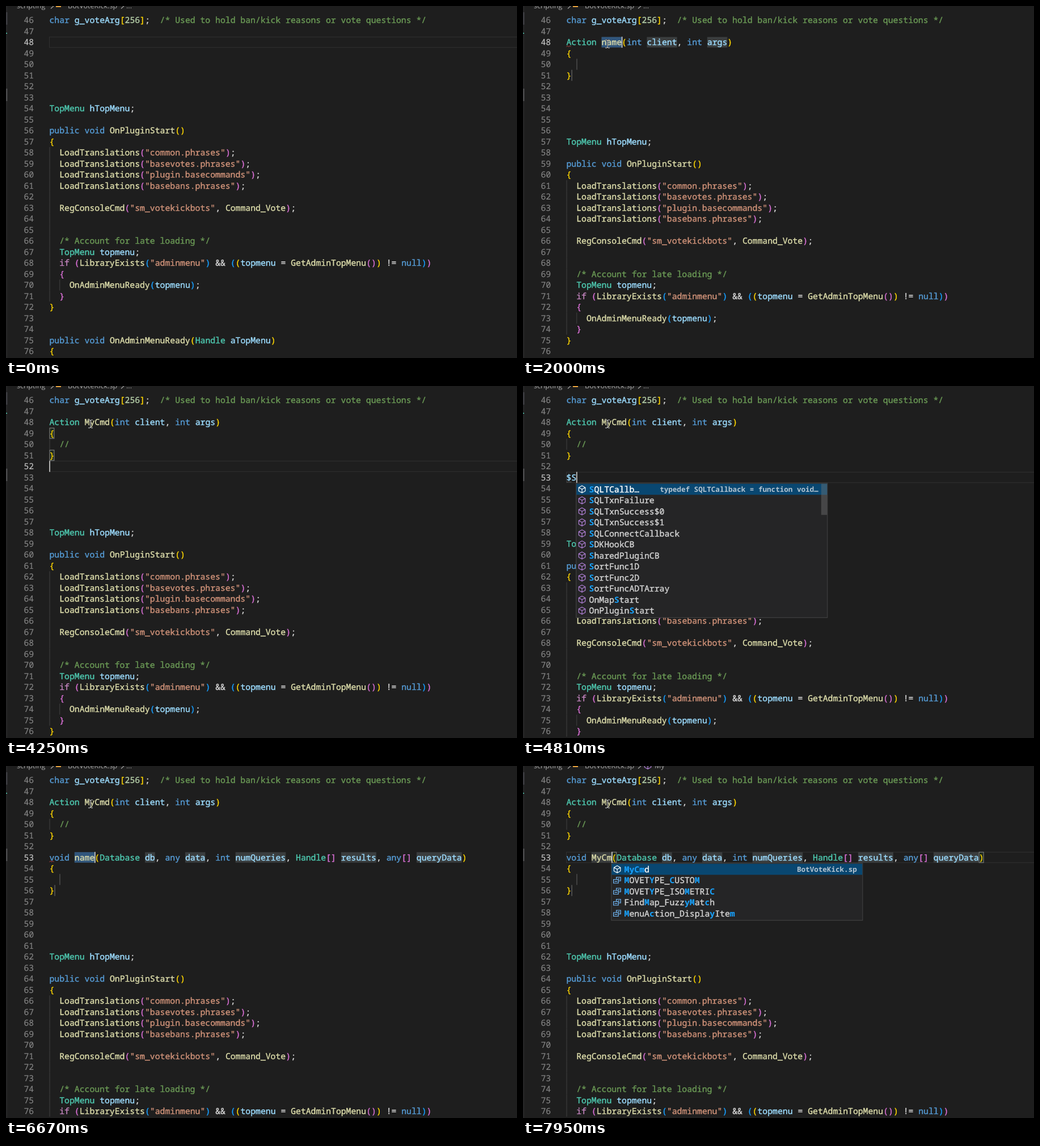
An HTML page that plays this animation: 901x622 px, repeating every 8000 ms.

```html
<!DOCTYPE html>
<html lang="en">
<head>
<meta charset="utf-8">
<title>Editor callbacks</title>
<style>
  html, body { margin: 0; width: 100%; height: 100%; overflow: hidden; background: #1e1e1e; }
  svg { display: block; width: 901px; height: 622px; }
  text {
    font: 500 14.78px "Noto Sans Mono", "DejaVu Sans Mono", monospace;
    text-rendering: geometricPrecision; white-space: pre;
    fill: currentColor; stroke: currentColor; stroke-width: .4px;
  }
  .num { color: #858585; stroke-width: .15px; }
  .now { color: #c6c6c6; }
  .crumb { font: 400 12.6px "Open Sans", "Noto Sans", sans-serif; color: #a9a9a9; stroke: none; }
  .hit { font-weight: 700; fill: #18a3ff; stroke: none; }
  .detail { font-size: 12.6px; font-weight: 600; color: #b4c4d0; text-anchor: end; stroke: none; }
</style>
</head>
<body>
<svg viewBox="0 0 901 622">
  <rect width="901" height="622" fill="#1e1e1e"/>
  <g id="edge">
    <rect width="2.5" height="622" fill="#252526"/>
    <rect y="11" width="2.5" height="22" fill="#3c3c40"/>
    <rect y="47.5" width="2" height="1.5" fill="#4ec9b0"/>
    <rect y="146" width="2.5" height="22" fill="#4a4a4c"/>
  </g>
  <g id="view"></g>
  <g id="mouse" fill="none">
    <path d="M-4-7h3l1 1 1-1h3M0-6V6M-4 7h3l1-1 1 1h3" stroke="#111" stroke-width="1.8"/>
    <path d="M-4-7h3l1 1 1-1h3M0-6V6M-4 7h3l1-1 1 1h3" stroke="#e4e4e4"/>
  </g>
</svg>
<script>
const LOOP = 8000, CW = 8.868, LH = 19.5, LEFT = 76.5, FIRST = 46, LAST = 76;
const view = document.getElementById('view');
const mouse = document.getElementById('mouse');

// Document

const intro = ['char g_voteArg[256];  /* Used to hold ban/kick reasons or vote questions */', ''];
const outro = `




TopMenu hTopMenu;

public void OnPluginStart()
{
  LoadTranslations("common.phrases");
  LoadTranslations("basevotes.phrases");
  LoadTranslations("plugin.basecommands");
  LoadTranslations("basebans.phrases");

  RegConsoleCmd("sm_votekickbots", Command_Vote);


  /* Account for late loading */
  TopMenu topmenu;
  if (LibraryExists("adminmenu") && ((topmenu = GetAdminTopMenu()) != null))
  {
    OnAdminMenuReady(topmenu);
  }
}


public void OnAdminMenuReady(Handle aTopMenu)
{`.split('\n');

const command = (name, body = '') => [`Action ${name}(int client, int args)`, '{', body, '}'];
const finished = [...command('MyCmd', '  //'), ''];
const query = name => [...finished,
  `void ${name}(Database db, any data, int numQueries, Handle[] results, any[] queryData)`, '{', '', '}'];

// Suggestion lists; "label|letters" overrides the letters to mark

const words = text => text.split(' ');
const clients = words('OnClientAuthorized OnClientCommand OnClientCommandKeyValues OnClientCommandKeyValues_Post OnClientConnect OnClientConnected OnClientDisconnect');
const conVars = words('ConCmd ConVarChanged ConVarQueryFinished$0 ConVarQueryFinished$1');
const callbacks = ['CommandListener', ...conVars, ...clients];
const coList = ['CommandListener', ...conVars, ...words('OnClientCommand OnClientCommandKeyValues OnClientCommandKeyValues_Post OnClientConnect OnClientConnected OnConfigsExecuted SQLConnectCallback')];
const conList = [...conVars, ...words('OnClientConnect OnClientConnected OnConfigsExecuted SQLConnectCallback')];
const txn = words('SQLTxnFailure SQLTxnSuccess$0 SQLTxnSuccess$1');
const sqlList = ['SQLTCallback', ...txn, 'SQLConnectCallback'];
const sList = [...sqlList, ...words('SDKHookCB SharedPluginCB SortFunc1D SortFunc2D SortFuncADTArray OnMapStart OnPluginStart')];
const enums = words('MOVETYPE_CUSTOM MOVETYPE_ISOMETRIC MOVETYPE_FLY MOVETYPE_NOCLIP MOVETYPE_WALK MOVETYPE_STEP MOVETYPE_PUSH MenuAction_Cancel MenuAction_Display MenuAction_DisplayItem MenuAction_End MenuAction_Select');
const myList = words('MOVETYPE_CUSTOM MOVETYPE_ISOMETRIC MOVETYPE_FLY MOVETYPE_NOCLIP MOVETYPE_WALK MOVETYPE_STEP MOVETYPE_PUSH MOVETYPE_VPHYSICS MenuAction_Display MenuAction_DisplayItem FindMap_FuzzyMatch');
const cmList = words('MOVETYPE_CUSTOM MOVETYPE_ISOMETRIC|mymc FindMap_FuzzyMatch|mymc MenuAction_DisplayItem|mcym');
const own = list => ['MyCmd', ...list].slice(0, 12);

// Timeline: each step changes part of the state

const base = { lines: [''], row: 48, col: 0, caret: 0, list: null, pick: 0, word: '', crumb: '', head: 0, sel: 0, err: 0, boxes: [] };
const typed = (before, row, text, list = null) =>
  ({ lines: [...before, text], row, col: text.length, caret: 1, list, pick: 0, word: text.slice(1) });
const named = (make, row, name, list = null, sel = 0) => {
  const lines = make(name), start = lines[row - 48].indexOf(name);
  return { lines, row, head: row, col: start + name.length, caret: 1, list, pick: 0, word: name, sel };
};
const dollar = (text, list) => typed([], 48, text, list);
const dollar2 = (text, list) => typed(finished, 53, text, list);
const cmdName = (...a) => named(command, 48, ...a);
const sqlName = (...a) => named(query, 53, ...a);
const bodyText = text => ({ lines: command('MyCmd', text), row: 50, col: text.length, caret: 1, list: null });
const braces = [[49, 0], [51, 0]];

const steps = [
  [0, {}],
  [330, { caret: 1 }],
  [880, dollar('$')],
  [930, dollar('$', callbacks)],
  [1090, dollar('$C', callbacks)],
  [1220, dollar('$Co', callbacks)],
  [1260, dollar('$Co', coList)],
  [1390, dollar('$Con', conList)],
  [1830, cmdName('name', null, 4)],
  [1980, { err: 1 }],
  [2240, { ...cmdName('M'), err: 0 }],
  [2280, cmdName('M', enums)],
  [2400, cmdName('My', enums)],
  [2440, { list: myList, crumb: 'My' }],
  [2570, cmdName('MyC', myList)],
  [2780, { ...cmdName('MyCm'), crumb: 'MyCm' }],
  [2810, cmdName('MyCm', cmList)],
  [2930, cmdName('MyCmd')],
  [3050, { crumb: 'MyCmd' }],
  [3260, bodyText('  ')],
  [3480, bodyText('  /')],
  [3600, bodyText('  //')],
  [3900, { row: 51, col: 1, head: 0, boxes: braces }],
  [4020, { crumb: '' }],
  [4230, { lines: finished, row: 52, col: 0 }],
  [4270, { boxes: [] }],
  [4320, { lines: [...finished, ''], row: 53 }],
  [4460, dollar2('$')],
  [4500, dollar2('$', callbacks)],
  [4700, dollar2('$S', sList)],
  [4880, dollar2('$SQ', sqlList)],
  [5040, dollar2('$SQL', sqlList)],
  [5300, dollar2('$SQLT')],
  [5340, dollar2('$SQLT', sqlList)],
  [5520, dollar2('$SQLTx', txn)],
  [5880, { pick: 1 }],
  [6380, { caret: 0 }],
  [6670, { ...sqlName('name', null, 4), err: 1 }],
  [7170, { ...sqlName('M'), err: 0 }],
  [7210, sqlName('M', enums)],
  [7440, sqlName('My', enums)],
  [7480, { list: own(myList) }],
  [7640, { crumb: 'My' }],
  [7810, sqlName('MyC', own(myList))],
  [7950, sqlName('MyCm', own(cmList))]
];
let last = base;
const states = steps.map(([at, change]) => (last = { ...last, ...change, at }));

// Drawing helpers

const esc = s => s.replace(/&/g, '&amp;').replace(/</g, '&lt;');
const rect = (x, y, w, h, fill, more = '') => `<rect x="${x}" y="${y}" width="${w}" height="${h}" fill="${fill}" ${more}/>`;
const text = (x, y, s, attrs) => `<text x="${x}" y="${y}" ${attrs}>${s}</text>`;
const stroke = (d, color, w = 1) => `<path d="${d}" fill="none" stroke="${color}" stroke-width="${w}"/>`;
const xAt = col => LEFT + col * CW;
const yMid = row => 25 + (row - FIRST) * LH;

const cube = (x, y, color) =>
  `<g transform="translate(${x} ${y})">${stroke('M0-6.3L5.7-3.2V3.2L0 6.3-5.7 3.2V-3.2ZM-5.7-3.2L0 0 5.7-3.2M0 0V6.3', color, 1.2)}</g>`;
const member = (x, y, color) =>
  `<g transform="translate(${x} ${y})">${stroke('M-1.5-2V-5.5H6V1H2.5M-6.5-1.5H2V5H-6.5ZM-4.5 1.8H0M1-3H4M4-1H4.5', color, 1.2)}</g>`;

const pairs = ['#ffd700', '#da70d6', '#179fff'];
const rules = [
  [/^(\/\*|\/\/)/, '#6a9955'], [/^"/, '#ce9178'], [/^\d/, '#b5cea8'], [/^if$/, '#c586c0'],
  [/^(char|public|void|int|any|null)$/, '#569cd6'],
  [/^(TopMenu|Handle|Database|Action)$/, '#4ec9b0'], [/^Command_Vote$/, '#dcdcaa']
];

function tokens(line, stack) {
  const out = [];
  for (const m of line.matchAll(/\/\*.*?\*\/|\/\/?.*|"[^"]*"|\$?\w+|\$|[()[\]{}]|[^\s\w]/g)) {
    const s = m[0], col = m.index;
    let color;
    if (/^[([{]$/.test(s)) color = pairs[stack.depth++ % 3];
    else if (/^[)\]}]$/.test(s)) color = pairs[--stack.depth % 3];
    else {
      const rule = rules.find(r => r[0].test(s));
      color = rule ? rule[1] : !/^[\w$]/.test(s) ? '#d4d4d4' : line[col + s.length] === '(' ? '#dcdcaa' : '#9cdcfe';
    }
    if (s === '{') stack.braces++;
    if (s === '}') stack.braces--;
    out.push({ s, col, color });
  }
  return out;
}

function crumbs(name) {
  const chevron = x => stroke(`M${x} 0l-5 4.5`, '#a9a9a9', 1.1);
  return text(19, 4, 'scripting', 'class="crumb"') + chevron(84) +
    rect(88, -7, 9, 9, '#e8a33d') + text(109, 4, 'BotVoteKick.sp', 'class="crumb"') + chevron(208) +
    (name ? cube(220, -1, '#b180d7') + text(232, 4, name, 'class="crumb"') : text(212, 4, '...', 'class="crumb"'));
}

// Indices of the letters that match what was typed
function hits(label, word) {
  const low = label.toLowerCase(), want = word.toLowerCase(), set = new Set();
  const run = low.indexOf(want);
  let from = 0;
  [...want].forEach((c, i) => {
    const at = run >= 0 ? run + i : low.indexOf(c, from);
    if (at >= 0) { set.add(at); from = at + 1; }
  });
  return set;
}

function popup(s) {
  const x = xAt(s.col) - 0.5, mid = yMid(s.row), top = mid + LH / 2;
  const high = s.list.length * LH + 3.5, full = s.list.length === 12;
  let out = rect(x, top + 0.5, 443, high, '#252526', 'stroke="#454545"');
  s.list.forEach((entry, i) => {
    const [label, letters = s.word] = entry.split('|');
    const y = mid + 21 + i * LH, on = i === s.pick;
    const isCube = /^(On|Con|Command|MyCmd|S)/.test(label);
    const mark = hits(label, letters);
    let shown = label;
    if (on) {
      out += rect(x + 0.5, y - LH / 2, 442, LH, '#094771');
      const mine = label === 'MyCmd';
      const detail = mine ? 'BotVoteKick.sp' : isCube ? `typedef ${label} = function${label.length < 14 ? ' void' : ''}…` : '';
      const room = Math.floor((372.5 - 7.56 * detail.length) / CW);
      if (label.length > room) shown = label.slice(0, room - 1) + '…';
      out += text(x + (mine ? 433 : 427), y + 4, detail, 'class="detail"');
    }
    const color = on ? '#fff' : isCube ? '#b180d7' : '#75beff';
    out += (isCube ? cube : member)(x + 10.3, y, color);
    const spans = [...shown].map((c, k) => mark.has(k) && c !== '…' ? `<tspan class="hit">${c}</tspan>` : c).join('');
    out += text(x + 22.8, y + 5.2, spans, `color="${on ? '#fff' : '#d4d4d4'}"`);
  });
  return full ? out + rect(x + 432, top + 1.5, 10.5, 55, '#797979', 'opacity=".4"') : out;
}

function snippet(s) {
  const y = yMid(s.head) - LH / 2, line = s.lines[s.head - 48];
  let out = '';
  for (const m of line.matchAll(/\w+(?=[,()])/g))
    out += rect(xAt(m.index), y + 0.5, m[0].length * CW, LH - 1, '#3a3d3e');
  out += rect(xAt(2), y + 2 * LH, 1.5, LH, '#4c4c4c') + rect(xAt(1), y + 3 * LH, 1.5, LH, '#5a5a5a');
  if (s.sel) out += rect(xAt(s.col - s.sel), y + 0.5, s.sel * CW, LH - 1, '#31567c');
  if (s.err) out += stroke(`M${LEFT} ${y + 18}l2-2 2 2 2-2 2 2`, '#c04040');
  return out;
}

function draw(s) {
  const y = yMid(s.row) - LH / 2, stack = { depth: 0, braces: 0 };
  let out = crumbs(s.crumb);
  if (!s.sel) out += rect(LEFT, y + 0.5, 840, LH - 1, 'none', 'stroke="#303030"');
  if (s.head) out += snippet(s);
  const atName = s.head === s.row && !s.sel;
  const boxes = atName ? [[s.row, s.col], [s.row, s.lines[s.row - 48].length - 1]] : s.boxes;
  for (const [row, col] of boxes)
    out += rect(xAt(col) + 0.5, yMid(row) - 9.25, CW - 1, LH - 1, '#1f2a1f', 'stroke="#888"');

  [...intro, ...s.lines, ...outro].slice(0, LAST - FIRST + 1).forEach((line, i) => {
    const row = FIRST + i, mid = yMid(row);
    out += text(31.5, mid + 5.2, row, `class="num${row === s.row ? ' now' : ''}"`);
    const guides = stack.braces - /^\s*}/.test(line);
    if (!(s.head && row === s.head + 2))
      for (let g = 0; g < guides; g++) out += rect(xAt(g * 2), mid - LH / 2, 1, LH, '#404040');
    for (const t of tokens(line, stack))
      out += text(xAt(t.col), mid + 5.2, esc(t.s), `color="${t.color}"`);
    if (line[0] === '$')
      for (let k = 0; k < 3; k++) out += rect(LEFT + 1 + k * 3, mid + 7.5, 1.2, 1.2, '#8a8a8a');
  });
  if (s.caret) out += rect(xAt(s.col) - 0.3, y, 1.7, LH, '#c8c8c6');
  if (s.list) out += popup(s);
  view.innerHTML = out;
}

function moveMouse(t) {
  const p = Math.min(1, Math.max(0, (t - 40) / 620)), e = 1 - (1 - p) ** 2.4;
  const x = 830 + (149 - 830) * e, y = 608 + (67 - 608) * e;
  mouse.setAttribute('transform', `translate(${x} ${y})`);
  mouse.setAttribute('visibility', t < 40 ? 'hidden' : 'visible');
}

let current = null;
function frame(now) {
  const t = now % LOOP;
  const s = states.findLast(state => state.at <= t);
  if (s !== current) draw(current = s);
  moveMouse(t);
  requestAnimationFrame(frame);
}
requestAnimationFrame(frame);
</script>
</body>
</html>
```
